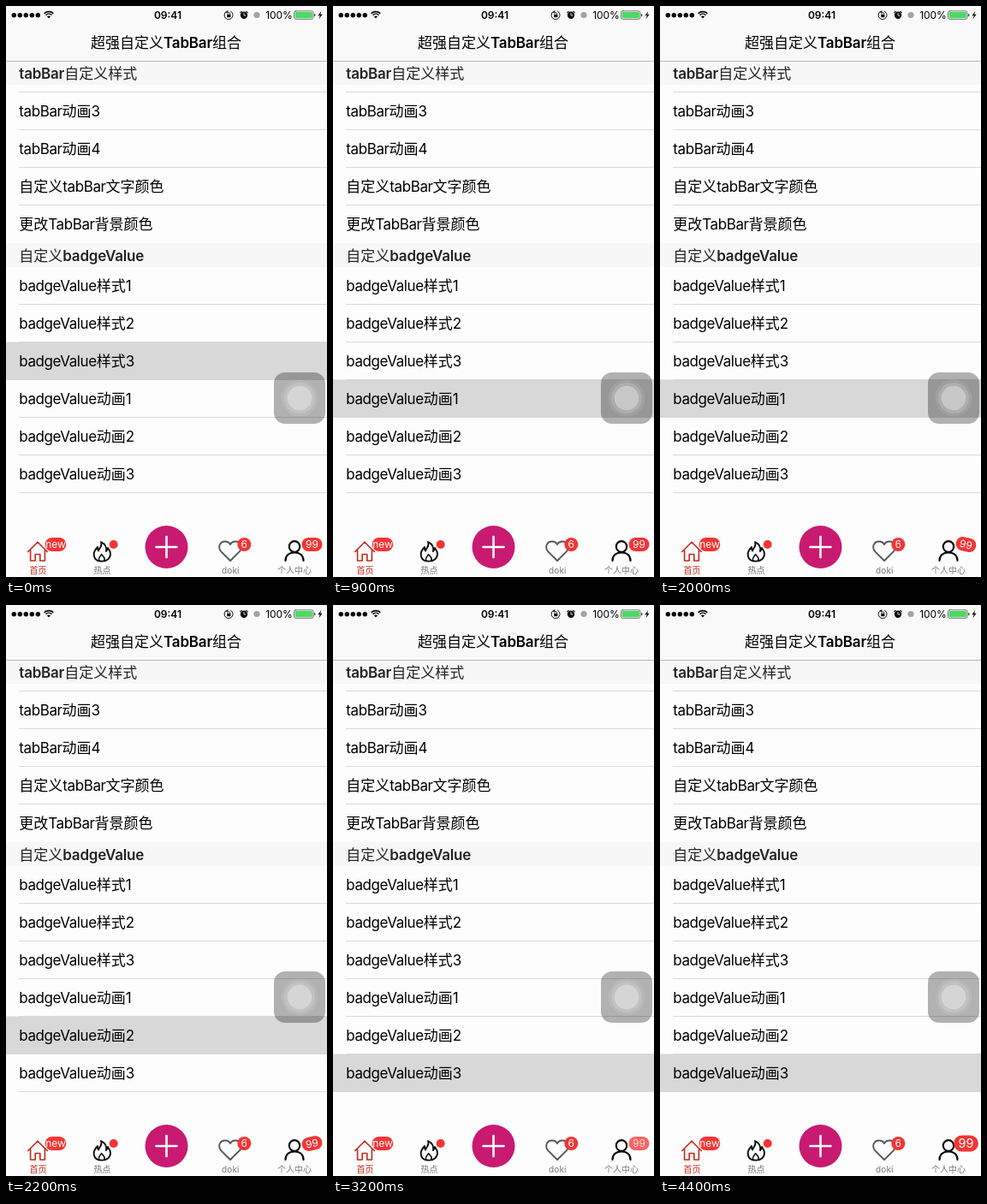
Recreate the animation shown at these times as an HTML page with a canvas. Size 375 by 667 pixels, loop 4.5 s.

```html
<!DOCTYPE html>
<html lang="zh-CN">
<head>
<meta charset="utf-8">
<style>
html, body { margin: 0; width: 100%; height: 100%; overflow: hidden; background: #fdfdfd; }
canvas { display: block; width: 375px; height: 667px; }
</style>
</head>
<body>
<canvas id="stage"></canvas>
<script>
const W = 375, H = 667, LOOP = 4500;
const FONT = 'Inter, "Noto Sans CJK SC", "Noto Sans CJK", sans-serif';
const RED = '#f43534', BRAND = '#c4281c', INK = '#0b0b0b';
const canvas = document.getElementById('stage');
const ctx = canvas.getContext('2d');
const dpr = window.devicePixelRatio || 1;
canvas.width = W * dpr;
canvas.height = H * dpr;

const customRows = ['tabBar动画3', 'tabBar动画4', '自定义tabBar文字颜色', '更改TabBar背景颜色'];
const badgeRows = ['样式1', '样式2', '样式3', '动画1', '动画2', '动画3'].map(s => 'badgeValue' + s);

function rect(x, y, w, h, color) {
  ctx.fillStyle = color;
  ctx.fillRect(x, y, w, h);
}

function pill(x, y, w, h, r, color) {
  ctx.fillStyle = color;
  ctx.beginPath();
  ctx.roundRect(x, y, w, h, r);
  ctx.fill();
}

function disc(x, y, r, color) {
  ctx.fillStyle = color;
  ctx.beginPath();
  ctx.arc(x, y, r, 0, Math.PI * 2);
  ctx.fill();
}

function line(d, color, width) {
  ctx.strokeStyle = color;
  ctx.lineWidth = width;
  ctx.lineJoin = ctx.lineCap = 'round';
  ctx.stroke(new Path2D(d));
}

function shape(d, color) {
  ctx.fillStyle = color;
  ctx.fill(new Path2D(d));
}

// Latin runs are tracked; Chinese runs are not, and use a lighter bold.
function text(str, x, y, { size = 17, weight = 400, color = '#000', center = false, track = 0 } = {}) {
  ctx.fillStyle = color;
  const runs = str.match(/[\x00-\x7f]+|[^\x00-\x7f]+/g).map(s => {
    const latin = s.charCodeAt(0) < 128;
    const run = { s, gap: latin ? track : 0, weight: latin ? weight : Math.min(weight, 500) };
    run.w = setRun(run, size).measureText(s).width;
    return run;
  });
  if (center) x -= runs.reduce((sum, r) => sum + r.w, 0) / 2;
  for (const run of runs) {
    setRun(run, size).fillText(run.s, x, y);
    x += run.w;
  }
}

function setRun(run, size) {
  ctx.font = `${run.weight} ${size}px ${FONT}`;
  ctx.letterSpacing = run.gap + 'px';
  return ctx;
}

function statusBar() {
  for (let i = 0; i < 5; i++) disc(9.3 + i * 7, 10.7, 2.75, INK);
  for (const r of [7.6, 4.9]) {
    ctx.strokeStyle = INK;
    ctx.lineWidth = 1.6;
    ctx.lineCap = 'butt';
    ctx.beginPath();
    ctx.arc(50, 14.2, r, -Math.PI * 0.75, -Math.PI * 0.25);
    ctx.stroke();
  }
  shape('M50 14.6L47.9 12.2Q50 10.6 52.1 12.2Z', INK);
  text('09:41', 189, 15, { size: 12, weight: 600, center: true });

  // rotation lock
  line('M257 6.6A5 5 0 1 0 262.5 6.2', INK, 1);
  shape('M256 7.4L259.3 5L259.3 8Z', INK);
  rect(258.2, 10, 4.2, 3.2, INK);
  line('M259 10V9A1.3 1.3 0 0 1 261.6 9V10', INK, 0.8);

  // alarm
  disc(278, 10.8, 4.2, INK);
  line('M273.8 7.6L275.2 6.4M282.2 7.6L280.8 6.4', INK, 1.2);
  line('M278 8.4V11H280', '#fff', 0.8);

  disc(293, 10.5, 3.6, '#a3a3a3');
  text('100%', 319, 15, { size: 12, center: true, track: -0.1 });

  ctx.strokeStyle = '#555';
  ctx.lineWidth = 0.8;
  ctx.beginPath();
  ctx.roundRect(336.5, 5.8, 22.5, 9.6, 2);
  ctx.stroke();
  pill(337.6, 6.9, 20.3, 7.4, 1, '#4cd964');
  pill(359.8, 8.9, 1.6, 3.4, 0.8, '#555');
  shape('M368.3 6L364.3 11.3H366.7L365.5 15.2L369.6 9.8H367.2Z', INK);
}

function header(y, label) {
  rect(0, y, W, 28, '#f7f7f7');
  text(label, 15.3, y + 20.5, { weight: 600, color: '#222', track: -0.22 });
}

function list(selected) {
  const cell = (label, y) => text(label, 15.3, y + 28, { track: -0.41 });
  const rule = y => rect(15, y, W - 15, 1, '#dadadc');
  rule(100);
  customRows.forEach((label, i) => {
    const y = 101 + i * 44;
    if (i < 3) rule(y + 43);
    cell(label, y);
  });
  header(277, '自定义badgeValue');
  badgeRows.forEach((label, i) => rule(348 + i * 44));
  rect(0, 304.5 + selected * 44, W, 44.5, '#d8d8d8');
  badgeRows.forEach((label, i) => cell(label, 305 + i * 44));
}

function navBar() {
  rect(0, 0, W, 64, '#f9f9f9');
  rect(0, 64, W, 1, '#b9b9b9');
  statusBar();
  text('超强自定义TabBar组合', 187, 48.5, { weight: 600, center: true, track: -0.2 });
}

function touchButton() {
  pill(313, 428, 60, 60, 13, 'rgba(0,0,0,.3)');
  disc(343, 458, 21.5, 'rgba(255,255,255,.09)');
  disc(343, 458, 18, 'rgba(255,255,255,.14)');
  disc(343, 458, 14.3, 'rgba(255,255,255,.32)');
}

function badge(label, x, w, { angle = 0, alpha = 1, scale = 1 } = {}) {
  ctx.save();
  ctx.translate(x, 629);
  ctx.rotate(angle);
  ctx.scale(scale, scale);
  ctx.globalAlpha = alpha;
  pill(-w / 2, -8, w, 16, 8, RED);
  text(label, 0, 4.3, { size: 12, color: '#fff', center: true });
  ctx.restore();
}

function tabBar(pose) {
  // home
  line('M25.7 637.5L37 626.2L48.3 637.5M28.6 636V648H34.2V640.5H39.8V648H45.4V636', BRAND, 1.6);
  // flame
  line('M111 626C113 631 109 633 108 636.5C107 635 107 633.5 107 632C103 636 102 640 103 643C104 647.5 108 648.6 112 648.6C118 648.6 122 645 122 640C122 637 120.5 635 119 633C119 635 118 636 117 637C118 632 115 628 111 626Z', INK, 1.9);
  line('M108.6 648C107.2 644.5 110 643.5 111.5 640.5C113 643 116.5 644 115 648', INK, 1.5);
  // heart
  line('M262 648L251.3 637.3C246.8 632 250 625.5 256 625.5C259 625.5 261 627 262 629C263 627 265 625.5 268 625.5C274 625.5 277.2 632 272.7 637.3Z', '#55575a', 1.9);
  // person
  line('M343.2 631.5A6.2 6.4 0 1 1 330.8 631.5A6.2 6.4 0 1 1 343.2 631.5M326.5 648C326.5 641.5 331 638.4 337 638.4C343 638.4 347.5 641.5 347.5 648', INK, 2.2);

  disc(187.5, 632, 25, '#c91a71');
  line('M187.5 620V644M175.5 632H199.5', '#fff', 2.6);

  const label = (s, x, style) => text(s, x, 663, { size: 10, color: '#777', center: true, ...style });
  label('首页', 37.5, { weight: 500, color: BRAND });
  label('热点', 112.5);
  label('doki', 262.3, { track: 0.2 });
  label('个人中心', 337);

  badge('new', 58, 24.5);
  disc(125.7, 629, 5, RED);
  badge('6', 278.3, 16);
  badge('99', 357.5, 24, pose);
}

const wave = (t, start, period) => Math.PI * 2 * (t - start) / period;

function badgePose(t) {
  if (t >= 3330) return { scale: 1.1 - 0.1 * Math.cos(wave(t, 3330, 428)) };
  if (t >= 2359) return { alpha: 0.66 + 0.34 * Math.cos(wave(t, 2359, 467)) };
  if (t >= 1037.5 && t < 2262.5) return { angle: -0.22 * Math.sin(wave(t, 1037.5, 350)) };
  return {};
}

function draw(t) {
  const selected = t < 900 ? 2 : t < 2100 ? 3 : t < 3200 ? 4 : 5;
  ctx.setTransform(dpr, 0, 0, dpr, 0, 0);
  rect(0, 0, W, H, '#fdfdfd');
  list(selected);
  header(64, 'tabBar自定义样式');
  navBar();
  tabBar(badgePose(t));
  touchButton();
}

// The picture advances in steps of 100 ms.
const begin = performance.now();
function tick() {
  draw(Math.floor((performance.now() - begin) % LOOP / 100 + 0.001) * 100);
  requestAnimationFrame(tick);
}
tick();
</script>
</body>
</html>
```
